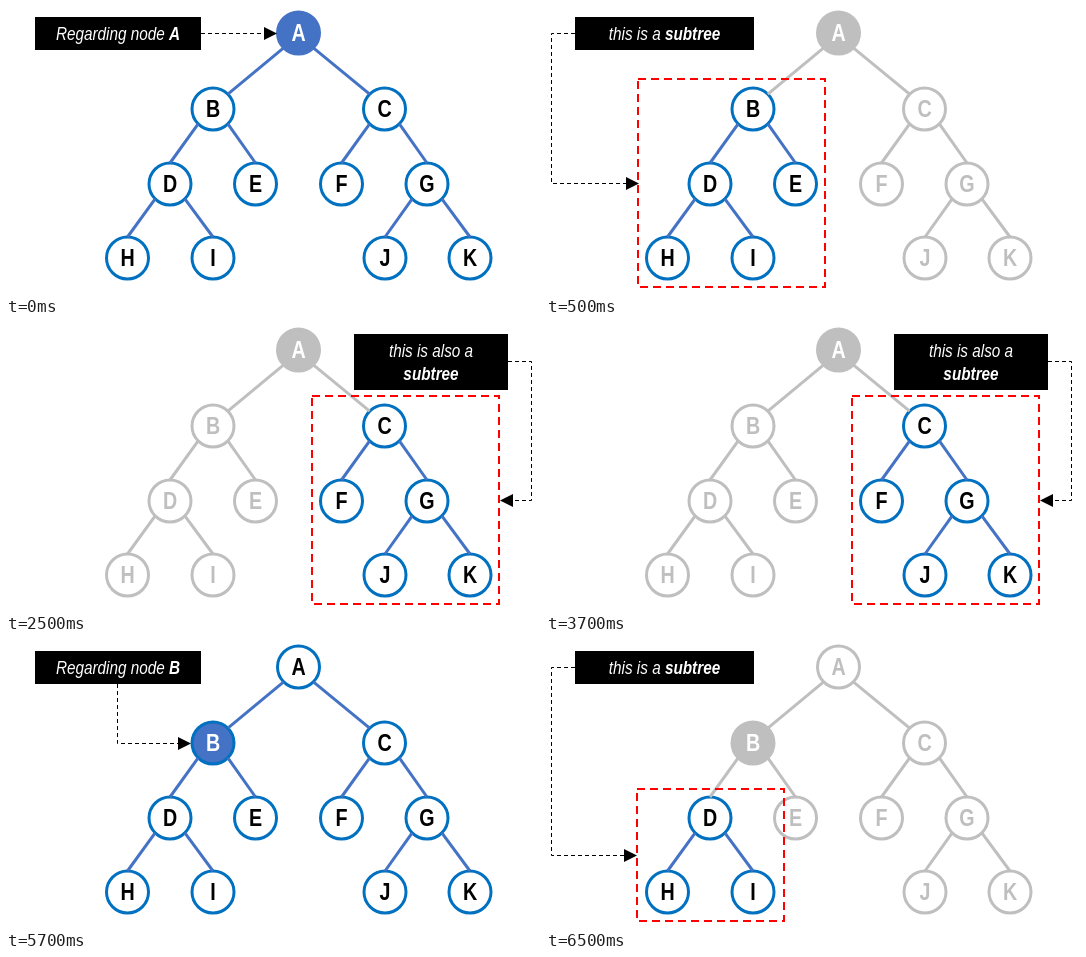
Animation of 534x289 px, one loop 8 s. Source, as an HTML page with a canvas:

```html
<!DOCTYPE html>
<html lang="en">
<head>
<meta charset="utf-8">
<title>Subtrees of a binary tree</title>
<style>
html, body { margin: 0; width: 100%; height: 100%; overflow: hidden; background: #fff; }
canvas { display: block; width: 534px; height: 289px; }
</style>
</head>
<body>
<canvas id="stage"></canvas>
<script>
const W = 534, H = 289, LOOP = 8000;
const R = 21, DIAG = R * Math.SQRT1_2;
const BLUE = '#4472c4', RING = '#0070c0', GREY = '#bfbfbf';
const FACE = '"Liberation Sans Narrow", "Arial Narrow", "Liberation Sans", Arial, sans-serif';

const canvas = document.getElementById('stage');
const ctx = canvas.getContext('2d');
const dpr = window.devicePixelRatio || 1;
canvas.width = W * dpr;
canvas.height = H * dpr;

const nodes = {
  A: [292.5, 27], B: [207, 103], C: [378.5, 103],
  D: [164, 178], E: [249.5, 178], F: [335.5, 178], G: [421, 178],
  H: [121.5, 252], I: [207, 252], J: [379, 252], K: [464, 252]
};
const edges = ['AB', 'AC', 'BD', 'BE', 'CF', 'CG', 'DH', 'DI', 'GJ', 'GK'];

// Captions are lists of lines; text between asterisks is bold.
const scenes = [
  { at: 0, live: 'ABCDEFGHIJK', solid: 'A', rim: BLUE,
    label: [29, 11, 166, 33], lines: ['Regarding node *A*'],
    arrow: [[195, 27.5], [271, 27.5]] },
  { at: 500, live: 'BDEHI', solid: 'A',
    label: [29, 11, 179, 33], lines: ['this is a *subtree*'],
    arrow: [[29, 27.5], [5.5, 27.5], [5.5, 177.5], [93, 177.5]],
    box: [92, 73, 187, 208] },
  { at: 2500, live: 'CFGJK', solid: 'A',
    label: [348, 11, 154, 56], lines: ['this is also a', '*subtree*'],
    arrow: [[502, 38.5], [525.5, 38.5], [525.5, 177.5], [494, 177.5]],
    box: [306, 73, 187, 208] },
  { at: 4500, live: 'ABCDEFGHIJK', solid: 'B', rim: RING,
    label: [29, 11, 166, 33], lines: ['Regarding node *B*'],
    arrow: [[111.5, 44], [111.5, 103.5], [185, 103.5]] },
  { at: 6500, live: 'DHI', solid: 'B',
    label: [29, 11, 179, 33], lines: ['this is a *subtree*'],
    arrow: [[29, 27.5], [5.5, 27.5], [5.5, 215.5], [91, 215.5]],
    box: [91, 149, 147, 132] }
];

let condense = 1;

function measureFace() {
  // Regular-width fallback faces are drawn condensed.
  ctx.font = '100px ' + FACE;
  condense = ctx.measureText('H').width > 65 ? 0.82 : 1;
}

function line(points, color, width, dash = []) {
  ctx.strokeStyle = color;
  ctx.lineWidth = width;
  ctx.setLineDash(dash);
  ctx.beginPath();
  points.forEach(([x, y]) => ctx.lineTo(x, y));
  ctx.stroke();
  ctx.setLineDash([]);
}

function text(runs, x, y, color) {
  const widths = runs.map(([font, str]) => {
    ctx.font = font;
    return ctx.measureText(str).width;
  });
  ctx.save();
  ctx.translate(x, y);
  ctx.scale(condense, 1);
  ctx.fillStyle = color;
  let pen = -widths.reduce((a, b) => a + b, 0) / 2;
  runs.forEach(([font, str], i) => {
    ctx.font = font;
    ctx.fillText(str, pen, 0);
    pen += widths[i];
  });
  ctx.restore();
}

function drawNode(name, s) {
  const [x, y] = nodes[name];
  const live = s.live.includes(name), solid = s.solid === name;
  ctx.beginPath();
  ctx.arc(x, y, R, 0, Math.PI * 2);
  ctx.fillStyle = !solid ? '#fff' : live ? BLUE : GREY;
  ctx.fill();
  ctx.strokeStyle = !live ? GREY : solid ? s.rim : RING;
  ctx.lineWidth = 3;
  ctx.stroke();
  const ink = solid ? '#fff' : live ? '#000' : GREY;
  text([['bold 24px ' + FACE, name]], x, y + 8.3, ink);
}

function drawEdge([from, to], s) {
  const [x1, y1] = nodes[from], [x2, y2] = nodes[to];
  const side = Math.sign(x2 - x1);
  const end = from === 'A'
    ? [x2 - side * DIAG, y2 - DIAG]
    : [x2, y2 - R];
  line([[x1 + side * DIAG, y1 + DIAG], end], s.live.includes(from) ? BLUE : GREY, 3);
}

function drawArrow(points) {
  const [tipX, tipY] = points[points.length - 1];
  const dir = Math.sign(tipX - points[points.length - 2][0]);
  const back = tipX - dir * 13;
  line([...points.slice(0, -1), [back, tipY]], '#000', 1, [4, 3]);
  ctx.fillStyle = '#000';
  ctx.beginPath();
  ctx.moveTo(tipX, tipY);
  ctx.lineTo(back, tipY - 6.5);
  ctx.lineTo(back, tipY + 6.5);
  ctx.fill();
}

function drawLabel({ label: [x, y, w, h], lines }) {
  ctx.fillStyle = '#000';
  ctx.fillRect(x, y, w, h);
  lines.forEach((str, i) => {
    const runs = str.split('*').map((part, k) =>
      [(k % 2 ? 'italic bold' : 'italic') + ' 18.67px ' + FACE, part]);
    text(runs, x + w / 2, 34 + i * 22.6, '#fff');
  });
}

function drawBox([x, y, w, h]) {
  line([[x, y], [x + w, y], [x + w, y + h], [x, y + h], [x, y]], '#f00', 2, [8, 5]);
}

function draw(t) {
  const s = scenes.filter(scene => scene.at <= t).pop();
  ctx.setTransform(dpr, 0, 0, dpr, 0, 0);
  ctx.fillStyle = '#fff';
  ctx.fillRect(0, 0, W, H);
  Object.keys(nodes).forEach(name => drawNode(name, s));
  edges.forEach(edge => drawEdge(edge, s));
  if (s.box) drawBox(s.box);
  drawArrow(s.arrow);
  drawLabel(s);
}

measureFace();
const start = performance.now();
function tick() {
  draw((performance.now() - start) % LOOP);
  requestAnimationFrame(tick);
}
tick();
</script>
</body>
</html>
```
